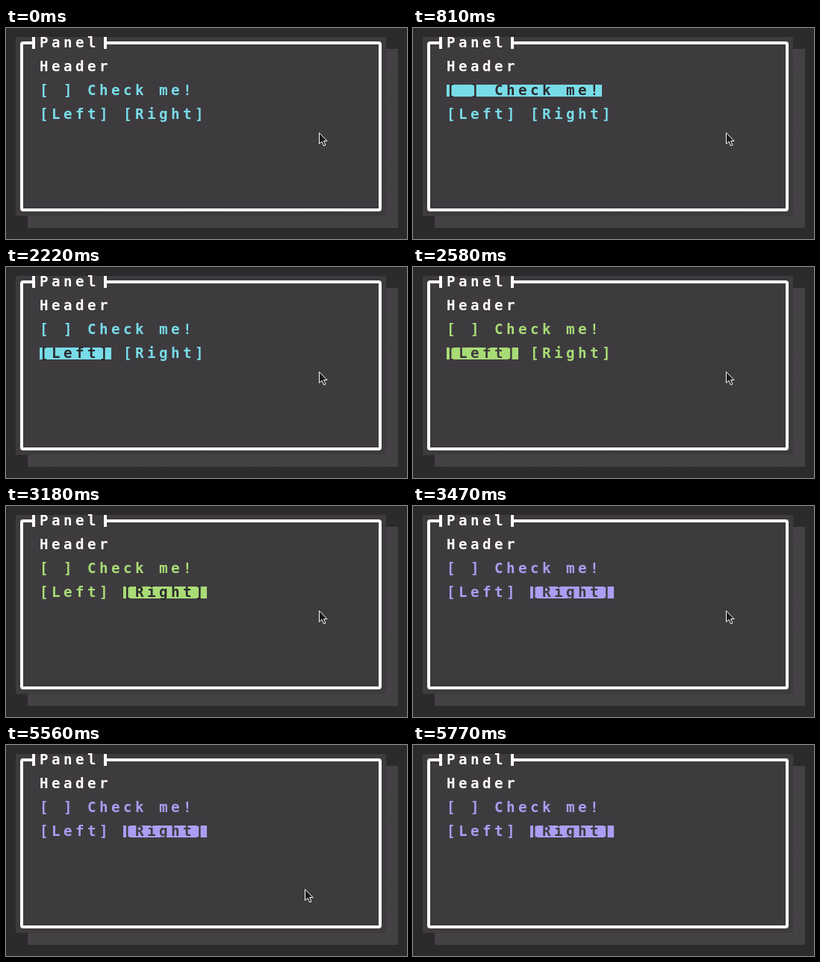
Animation of 537x283 px, one loop 6.1 s. Source, as an HTML page:

```html
<!DOCTYPE html>
<html lang="en">
<head>
<meta charset="utf-8">
<title>Panel</title>
<style>
  html, body { margin: 0; height: 100%; overflow: hidden; background: #2d2a2e; }
  svg { display: block; width: 537px; height: 283px; }
  text {
    font: bold 19.2px "DejaVu Sans Mono", monospace;
    letter-spacing: calc(16px - 1ch);
    fill: #fffcfa;
  }
</style>
</head>
<body>
<svg viewBox="0 0 537 283">
  <defs>
    <pattern id="shade" width="2" height="2" patternUnits="userSpaceOnUse">
      <path d="M0 0h1v1h-1zM1 1h1v1h-1z" fill="#5b595c" shape-rendering="crispEdges"/>
    </pattern>
  </defs>
  <rect x="29" y="28" width="496" height="240" fill="url(#shade)"/>
  <rect x="13" y="12" width="496" height="240" fill="#3e3b3f"/>
  <path d="M37 20H23q-2 0-2 2V242q0 2 2 2H499q2 0 2-2V22q0-2-2-2H133M37 12v16M133 12v16"
        fill="none" stroke="#fffaf8" stroke-width="4"/>
  <text x="45" y="26">Panel</text>
  <text x="45" y="58">Header</text>
  <g id="widgets"></g>
  <path id="pointer" d="M.5 .5V15.5L4 12.3L6.5 18L9 17L6.6 11.5H11Z"
        fill="#1c1a1d" stroke="#fff"/>
</svg>
<script>
const LOOP = 6100, CELL = 16;
const DARK = '#2d2a2e', PANEL = '#3e3b3f';
const CYAN = '#78dce8', GREEN = '#a9dc76', PURPLE = '#ab9df2';

// start time, accent colour, selected widget, its text colour, check mark
const states = [
  [0, CYAN, -1, DARK, ' '],
  [810, CYAN, 0, DARK, ' '],
  [1530, CYAN, 0, PANEL, '*'],
  [1890, CYAN, 0, PANEL, ' '],
  [2220, CYAN, 1, DARK, ' '],
  [2580, GREEN, 1, PANEL, ' '],
  [3180, GREEN, 2, DARK, ' '],
  [3470, PURPLE, 2, PANEL, ' '],
];

const MOVE = { start: 5420, end: 5770, steps: 12 };
const pointer = document.getElementById('pointer');

function add(tag, attributes) {
  const node = document.createElementNS('http://www.w3.org/2000/svg', tag);
  for (const name in attributes) node.setAttribute(name, attributes[name]);
  return document.getElementById('widgets').appendChild(node);
}

function widget(label, x, y) {
  const box = add('rect', { x, y, width: label.length * CELL, height: CELL });
  const text = add('text', { x, y: y + 14 });
  text.textContent = label;
  return { box, text };
}

const widgets = [
  widget('[ ] Check me!', 45, 76),
  widget('[Left]', 45, 108),
  widget('[Right]', 157, 108),
];

const quadratic = (a, b, c, u) => (1 - u) ** 2 * a + 2 * u * (1 - u) * b + u * u * c;

function drawPointer(time) {
  let x = 419, y = 140;
  if (time >= MOVE.start) {
    const step = Math.floor((time - MOVE.start) / (MOVE.end - MOVE.start) * MOVE.steps);
    const u = step / (MOVE.steps - 1);
    x = Math.round(quadratic(417, 359, 489, u));
    y = Math.round(quadratic(151, 206, 278, u));
  }
  pointer.setAttribute('transform', `translate(${x} ${y})`);
  pointer.style.display = time < MOVE.end ? '' : 'none';
}

function draw(time) {
  const [, accent, selected, ink, mark] = states.findLast(state => state[0] <= time);
  widgets.forEach(({ box, text }, i) => {
    box.style.fill = i === selected ? accent : 'none';
    text.style.fill = i === selected ? ink : accent;
  });
  widgets[0].text.textContent = `[${mark}] Check me!`;
  drawPointer(time);
}

function tick() {
  draw(performance.now() % LOOP);
  requestAnimationFrame(tick);
}
tick();
</script>
</body>
</html>
```
